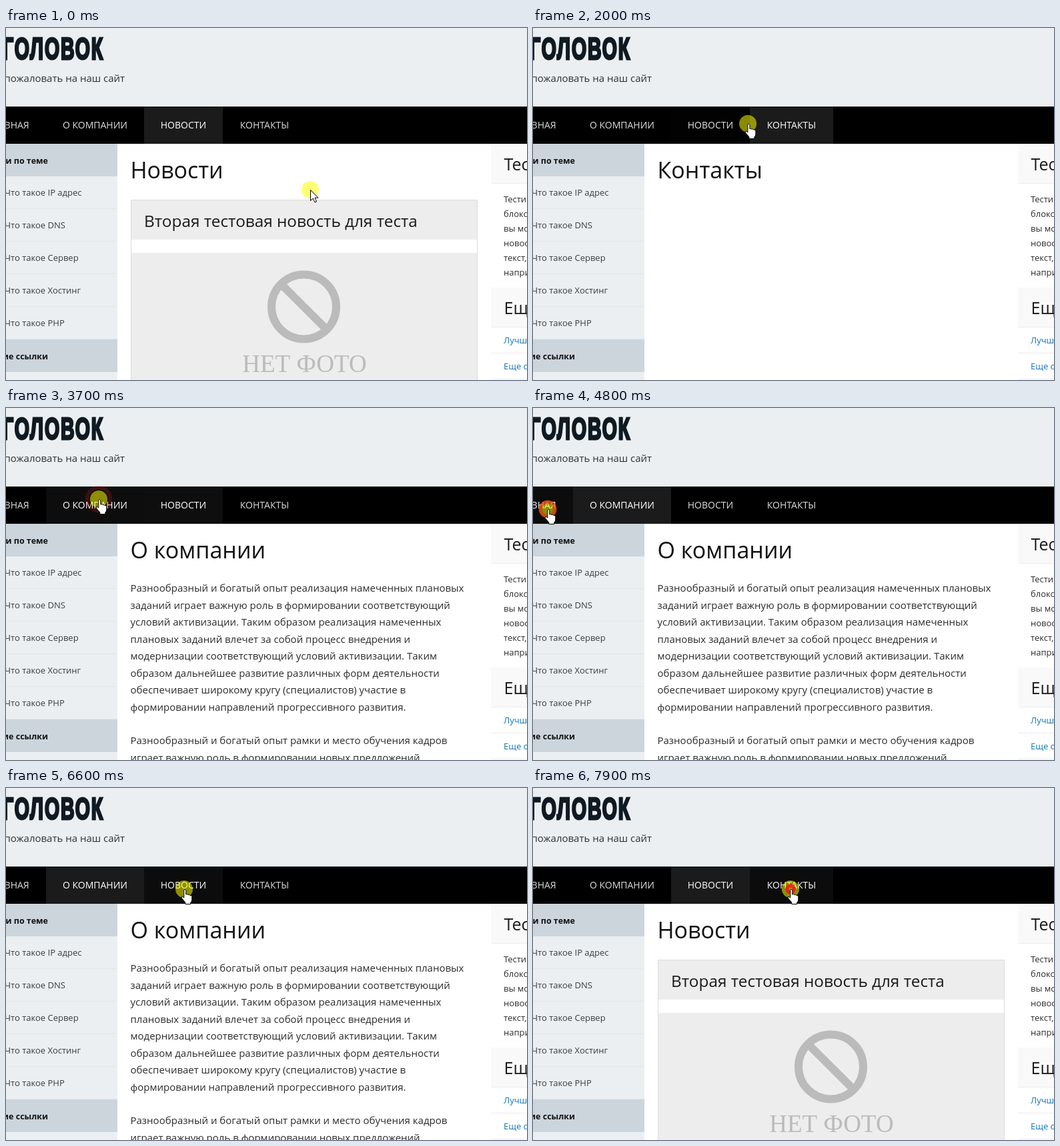
Animation of 781 by 529 pixels, one loop 8000 ms. Source, as an HTML page:

```html
<!DOCTYPE html>
<html lang="ru">
<head>
<meta charset="utf-8">
<title>Меню сайта</title>
<style>
html, body { margin: 0; width: 100%; height: 100%; overflow: hidden; background: #fff; }
svg { display: block; width: 781px; height: 529px; font-family: "Open Sans", "Noto Sans", sans-serif; }
text { white-space: pre; }
</style>
</head>
<body>
<svg id="stage" viewBox="0 0 781 529"></svg>
<script>
const LOOP = 8000;
const stage = document.getElementById('stage');

const rect = (x, y, w, h, fill, more = '') =>
  `<rect x="${x}" y="${y}" width="${w}" height="${h}" fill="${fill}" ${more}/>`;
const text = (x, y, size, fill, str, more = '') =>
  `<text x="${x}" y="${y}" font-size="${size}" fill="${fill}" ${more}>${str}</text>`;
const lines = (x, y, step, size, list) =>
  list.map((s, i) => text(x, Math.round(y + i * step), size, '#2b2b2b', s)).join('');
const END = 'text-anchor="end"';
const MIDDLE = 'text-anchor="middle"';

function header() {
  return rect(0, 0, 781, 118, '#ebeff2') +
    `<text transform="translate(147 47.4) scale(.62 1)" font-family="Liberation Sans, Arial, sans-serif"
      font-weight="700" font-size="46" letter-spacing="3" fill="#101a22" stroke="#101a22"
      stroke-width="3.2" ${END}>ЗАГОЛОВОК</text>` +
    text(178, 81, 15, '#2e3133', 'Добро пожаловать на наш сайт', END);
}

function sidebar() {
  const head = (y, s) => rect(0, y, 167, 49, '#cdd5dc') +
    text(63, y + 30, 12.5, '#111', s, END + ' font-weight="700"');
  const item = (s, i) => text(-2, 252 + 49 * i, 13, '#3a3d40', 'Что такое ' + s) +
    rect(0, 271 + 49 * i, 167, 1, '#e1e6ea');
  return rect(0, 174, 167, 355, '#ebeff2') +
    ['IP адрес', 'DNS', 'Сервер', 'Хостинг', 'PHP'].map(item).join('') +
    head(174, 'Статьи по теме') + head(468, 'Другие ссылки');
}

function aside() {
  const rule = y => rect(727, y, 54, 1, '#ececec');
  const head = (y, h, s) => rect(727, y, 54, h, '#f9f9f9') + rule(y + h - 1) +
    text(746.5, y + 40, 25, '#1a1a1a', s);
  const link = (y, s) => text(746, y, 13, '#0e75b8', s) + rule(y + 14);
  return head(174, 60, 'Тестовый') + head(390, 60, 'Еще блок') +
    lines(746, 262, 22, 13, ['Тестирование', 'блоков, где', 'вы можете', 'новости или', 'текст, для', 'например']) +
    link(474, 'Лучшие') + link(513, 'Еще ссылки');
}

const title = s => text(186.5, 226, 34, '#111', s);
const paragraph = (y, list) => lines(186.5, y, 25.5, 15, list);

const home = title('Достоинства компании') +
  paragraph(276, [
    'Задача организации, в особенности же постоянное информационно-',
    'пропагандистское обеспечение нашей деятельности представляет',
    'собой интересный эксперимент проверки форм развития. Таким',
    'образом консультация с широким активом играет важную роль в',
    'формировании форм развития. Товарищи! укрепление и развитие',
    'структуры позволяет оценить значение модели развития.',
    'Повседневная практика показывает, что дальнейшее развитие',
    'различных форм деятельности играет важную роль в формировании',
    'новых предложений.']) +
  '<circle cx="246" cy="525" r="3" fill="#2b2b2b"/>' +
  text(257, 530, 15, '#2b2b2b', 'Првые в мире производители самой лучших созданий');

const company = title('О компании') +
  paragraph(276, [
    'Разнообразный и богатый опыт реализация намеченных плановых',
    'заданий играет важную роль в формировании соответствующий',
    'условий активизации. Таким образом реализация намеченных',
    'плановых заданий влечет за собой процесс внедрения и',
    'модернизации соответствующий условий активизации. Таким',
    'образом дальнейшее развитие различных форм деятельности',
    'обеспечивает широкому кругу (специалистов) участие в',
    'формировании направлений прогрессивного развития.']) +
  paragraph(505, [
    'Разнообразный и богатый опыт рамки и место обучения кадров',
    'играет важную роль в формировании новых предложений']);

const news = title('Новости') +
  rect(187.5, 258.5, 519, 290, '#fff', 'stroke="#dcdcdc"') +
  rect(188, 259, 518, 59, '#ededed') + rect(188, 338, 518, 191, '#ededed') +
  text(207, 299, 24.3, '#1a1a1a', 'Вторая тестовая новость для теста') +
  `<g fill="none" stroke="#bbb" stroke-width="12"><circle cx="446.5" cy="419" r="48.5"/>
    <path d="M412.500 385L480.500 453"/></g>` +
  text(447.5, 517, 37, '#bbb', 'НЕТ ФОТО', MIDDLE + ' font-family="Liberation Serif, Times, serif"');

const pages = [home, company, news, title('Контакты')];
const names = ['ГЛАВНАЯ', 'О КОМПАНИИ', 'НОВОСТИ', 'КОНТАКТЫ'];
const edges = [-53, 60, 207, 325, 450];
const NAV = { top: 118, h: 56 };

// The mouse sets out a while after each click and rests before the next
const [HOME, COMPANY, NEWS, CONTACTS] = [0, 1, 2, 3];
const PAUSE = 430, TRAVEL = .72, LOAD = 165, FADE = 250;
const clicks = [
  { tab: CONTACTS, at: 1240, x: 391, y: 145 },
  { tab: NEWS, at: 2445, x: 283, y: 143 },
  { tab: COMPANY, at: 3420, x: 139, y: 137 },
  { tab: HOME, at: 4660, x: 22, y: 152 },
  { tab: COMPANY, at: 5690, x: 116, y: 139 },
  { tab: NEWS, at: 6610, x: 267, y: 152 },
  { tab: CONTACTS, at: 7880, x: 386, y: 152 }
];

stage.innerHTML = rect(0, 0, 781, 529, '#fff') + header() + sidebar() + aside() +
  pages.map((p, i) => `<g id="page${i}">${p}</g>`).join('') +
  rect(0, NAV.top, 781, NAV.h, '#000') +
  names.map((s, i) => `<g id="tab${i}">` +
    rect(edges[i], NAV.top, edges[i + 1] - edges[i], NAV.h, '#000') +
    text((edges[i] + edges[i + 1]) / 2, 151, 14, '#ddd', s, MIDDLE) + '</g>').join('') +
  `<g id="mouse">
    <circle r="13" fill="#ff0" opacity=".54"/>
    <circle id="ring" fill="none" stroke="#e8221c" stroke-width="5.5"/>
    <path id="arrow" d="M.5 .5V16.500L4.300 13L7 19L9.500 18L7 12.200H12Z" fill="#fff" stroke="#000"/>
    <path id="hand" transform="translate(-1.2 0)" d="M1 1.500Q2.500 -.8 4 1.500V8Q6 6.800 7 8.500Q9 7.500 10 9.300
      Q13 8.600 13 11.500V16Q13 18.500 11 20V22.500H3V20L-2.500 13.500Q-3.500 11 -1 11.500L1 13Z"
      fill="#fff" stroke="#000"/>
  </g>`;

const $ = id => document.getElementById(id);
const show = (el, on) => el.setAttribute('display', on ? 'inline' : 'none');
const clamp = v => Math.min(1, Math.max(0, v));
const ease = p => p * p * (3 - 2 * p);
const grey = v => { const n = Math.round(v); return `rgb(${n},${n},${n})`; };

function mouseAt(t) {
  let x = 456, y = 243, leave = 0;
  for (const c of clicks) {
    const p = ease(clamp((t - leave) / (TRAVEL * (c.at - leave))));
    x += (c.x - x) * p;
    y += (c.y - y) * p;
    leave = c.at + PAUSE;
  }
  return [x, y];
}

// Share of the active look each tab holds while one hands it to the next
function activeAt(t) {
  let share = names.map((_, i) => +(i === NEWS));
  for (const c of clicks) {
    const p = clamp((t - c.at - LOAD) / FADE);
    share = share.map((s, i) => s + ((i === c.tab) - s) * p);
  }
  return share;
}

function draw(t) {
  const [x, y] = mouseAt(t);
  const inNav = y > NAV.top && y < NAV.top + NAV.h && x < edges[4];
  const active = activeAt(t);
  const loaded = clicks.filter(c => c.at + LOAD <= t).pop();
  const page = loaded ? loaded.tab : NEWS;

  names.forEach((_, i) => {
    show($('page' + i), i === page);
    const inside = Math.min(x - edges[i], edges[i + 1] - x, y - NAV.top);
    const level = Math.max(active[i], .45 * clamp(inside / 15));
    const [box, label] = $('tab' + i).children;
    box.setAttribute('fill', grey(27 * level));
    label.setAttribute('fill', grey(221 + 34 * clamp(level * 2)));
  });

  $('mouse').setAttribute('transform', `translate(${x.toFixed(1)} ${y.toFixed(1)})`);
  show($('arrow'), !inNav);
  show($('hand'), inNav);

  const clicked = clicks.filter(c => c.at <= t).pop();
  const age = clicked ? t - clicked.at : LOOP;
  $('ring').setAttribute('r', 4 + 14 * clamp(age / 290));
  $('ring').setAttribute('opacity', clamp(.95 - age / 380));
}

const start = performance.now();
function tick() {
  draw((performance.now() - start) % LOOP);
  requestAnimationFrame(tick);
}
tick();
</script>
</body>
</html>
```
